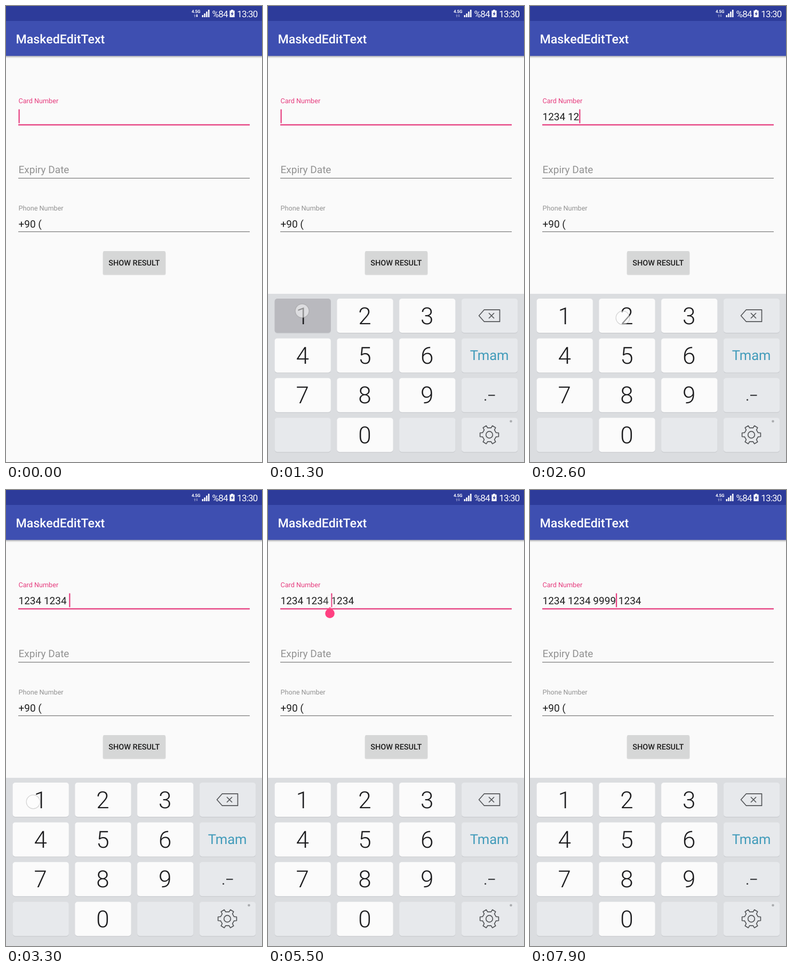
An HTML page that plays this animation: 480x854 px, repeating every 8000 ms.

```html
<!DOCTYPE html>
<html lang="en">
<head>
<meta charset="utf-8">
<title>MaskedEditText</title>
<style>
  html, body { margin: 0; width: 100%; height: 100%; overflow: hidden; background: #fafafa; }
  svg { display: block; width: 480px; height: 854px; }
  text { font-family: Roboto, sans-serif; text-rendering: geometricPrecision; white-space: pre; }
  .medium { font-weight: 500; }
  .field { font-size: 19px; fill: #1d1d1d; }
  .label { font-size: 12.65px; }
  .hint { fill: #929292; }
  .status { font-size: 17px; letter-spacing: -.8px; fill: #fff; }
  .digit { font-size: 44px; font-weight: 300; text-anchor: middle; fill: #1c1c1e; }
  .icon { fill: none; stroke: #55575a; stroke-width: 1.7; stroke-linejoin: round; }
</style>
</head>
<body>
<svg viewBox="0 0 480 854">
  <defs>
    <linearGradient id="shade" x1="0" y1="0" x2="0" y2="1">
      <stop offset="0" stop-color="#000" stop-opacity=".3"/>
      <stop offset="1" stop-color="#000" stop-opacity="0"/>
    </linearGradient>
  </defs>
  <rect width="480" height="854" fill="#fafafa"/>

  <rect y="93" width="480" height="5" fill="url(#shade)"/>
  <rect y="28" width="480" height="65.5" fill="#3e4fb1"/>
  <rect width="480" height="28" fill="#2d3b9a"/>
  <text class="medium" x="18.5" y="69.7" font-size="23.2" fill="#fff">MaskedEditText</text>

  <text x="348" y="13.4" font-size="8" font-weight="700" fill="#fff" letter-spacing="-.2">4.5G</text>
  <path id="upArrow" d="M354 15.5l2 2.5h-1.2v3h-1.6v-3h-1.2z" fill="#fff"/>
  <path id="downArrow" d="M358 21l2-2.5h-1.2v-3h-1.6v3h-1.2z" fill="#fff"/>
  <path d="M367.5 17h2.6v4h-2.6zM371.3 14h2.6v7h-2.6zM375.1 10.5h2.6v10.5h-2.6zM378.9 7h2.6v14h-2.6z" fill="#fff"/>
  <text class="status" x="386.5" y="20.6">%84</text>
  <path d="M422 7h4v1.6h2.6v12.4h-9.2V8.600h2.600z" fill="#fff"/>
  <path d="M425.300 10l-4 5.200h2.400l-1 4 4.200-5.400h-2.500z" fill="#2d3b9a"/>
  <text class="status" x="433.200" y="20.600">13:30</text>

  <text class="label" x="23.500" y="182" fill="#e63c7e">Card Number</text>
  <text id="card" class="field" x="23.500" y="214"></text>
  <rect x="23" y="221.400" width="434" height="2.300" fill="#e63c7e"/>
  <rect id="caret" y="193.500" width="2.200" height="26" fill="#e63c7e"/>
  <path id="handle" d="M116 219L122.500 225.200A8.800 8.800 0 1 1 109.500 225.200Z" fill="#ff4081"/>

  <text class="field hint" x="23.500" y="313" style="fill:#929292">Expiry Date</text>
  <rect x="23" y="321.900" width="434" height="1.200" fill="#777"/>
  <text class="label hint" x="23.500" y="382.500">Phone Number</text>
  <text class="field" x="23.500" y="414.500">+90 (</text>
  <rect x="23" y="422.100" width="434" height="1.200" fill="#777"/>

  <rect x="181.500" y="460.500" width="118" height="43.500" rx="3" fill="#000" opacity=".12"/>
  <rect x="182" y="459" width="117" height="43.300" rx="2.300" fill="#d6d7d7"/>
  <text class="medium" x="240.200" y="485.700" font-size="14.500" text-anchor="middle" fill="#1d1d1d">SHOW RESULT</text>

  <g id="keyboard">
    <rect y="539" width="480" height="315" fill="#dbdde0"/>
    <g id="keys"></g>
    <path class="icon" d="M395.500 580l10-11.200h29v22.400h-29zM414 575l10 10m0-10l-10 10"/>
    <text x="415.200" y="663" font-size="25.600" text-anchor="middle" fill="#419bba">Tmam</text>
    <text x="404" y="739" font-size="28" fill="#3d3f42">.</text>
    <rect x="413" y="728" width="12.500" height="2.200" fill="#3d3f42"/>
    <path id="gear" class="icon"/>
    <circle class="icon" cx="415" cy="803" r="6.300"/>
    <circle cx="455.500" cy="777.700" r="2.300" fill="#a9abae"/>
  </g>
  <circle id="touch" r="12.800" fill="#fff" fill-opacity=".52" stroke="#777" stroke-opacity=".3" stroke-width="1.300"/>
</svg>
<script>
const LOOP = 8000, STEP = 100;
const $ = id => document.getElementById(id);

function add(parent, tag, attrs, text = '') {
  const el = document.createElementNS('http://www.w3.org/2000/svg', tag);
  for (const k in attrs) el.setAttribute(k, attrs[k]);
  el.textContent = text;
  parent.appendChild(el);
  return el;
}

const keys = {};
['123<', '456T', '789.', ' 0 *'].forEach((row, r) => [...row].forEach((name, c) => {
  const x = 12.5 + c * 116.8, y = 548 + r * 74.4;
  const box = { x, width: 105.3, height: 64, rx: 5 };
  const digit = name >= '0' && name <= '9';
  add($('keys'), 'rect', { ...box, y: y + 1.2, fill: '#c9cbcf' });
  const face = add($('keys'), 'rect', { ...box, y, fill: digit ? '#fbfbfb' : '#e7e9ec' });
  if (digit) {
    keys[name] = face;
    add($('keys'), 'text', { class: 'digit', x: x + 52.2, y: y + 47.5 }, name);
  }
}));

// six-toothed outline: wide valleys, narrower raised teeth
function gearPath(cx, cy, teeth) {
  const corners = [[-.29, 13.2], [-.2, 17.8], [.2, 17.8], [.29, 13.2]];
  const pts = [];
  for (let i = 0; i < teeth; i++)
    for (const [da, r] of corners) {
      const a = (i + .5) * 2 * Math.PI / teeth + da;
      pts.push((cx + r * Math.sin(a)).toFixed(1) + ' ' + (cy - r * Math.cos(a)).toFixed(1));
    }
  return 'M' + pts.join('L') + 'Z';
}
$('gear').setAttribute('d', gearPath(415, 803, 6));

// x, y, down, up, key
const taps = [
  [190, 208, 450, 550, ''],
  [64, 571, 1250, 1400, '1'], [176, 583, 1520, 1600, '2'],
  [292, 583, 1720, 1800, '3'], [56, 654, 1910, 2000, '4'],
  [56, 582, 2250, 2350, '1'], [174, 584, 2500, 2600, '2'],
  [290, 584, 2700, 2800, '3'], [54, 658, 2930, 3030, '4'],
  [51, 584, 3350, 3430, '1'], [172, 586, 3560, 3650, '2'],
  [288, 586, 3800, 3900, '3'], [50, 667, 4050, 4180, '4'],
  [117, 210, 5250, 5350, 'place'],
  [307, 743, 6300, 6400, '9'], [306, 742, 6800, 6900, '9'],
  [306, 742, 7150, 7250, '9'], [307, 743, 7500, 7600, '9']
];
const FONT = 19, DIGIT = .5615 * FONT, SPACE = .2475 * FONT;

function group(digits) {
  const s = digits.replace(/(.{4})/g, '$1 ');
  return digits.length >= 16 ? s.trim() : s;
}

function entry(t) {
  let digits = '', at = 0, atEnd = true, reset = t >= 900 ? 900 : -100;
  for (const [, , , up, key] of taps) {
    if (t < up) break;
    reset = Math.max(reset, up);
    if (key === 'place') {
      // the remaining four digits follow the ones typed at the caret
      at = 8;
      atEnd = false;
    } else if (key) {
      digits = digits.slice(0, at) + key + digits.slice(at);
      at++;
    }
  }
  const spaces = atEnd ? Math.floor(at / 4) : Math.ceil(at / 4) - (at === 8 ? 0 : 1);
  return { text: group(digits), x: 23.5 + at * DIGIT + spaces * SPACE, on: (t - reset) % 1000 < 500 };
}

const clamp = v => Math.min(1, Math.max(0, v));
const show = (el, on) => el.setAttribute('opacity', +on);

function draw(t) {
  const { text, x, on } = entry(t);
  $('card').textContent = text;
  $('caret').setAttribute('x', x);
  show($('caret'), on);
  show($('handle'), t >= 5350 && t < 6600);

  const rise = 1 - (1 - clamp((t - 600) / 300)) ** 3;
  $('keyboard').setAttribute('transform', `translate(0 ${315 * (1 - rise)})`);

  for (const k in keys) keys[k].setAttribute('fill', '#fbfbfb');
  let glow = 0;
  for (const [tx, ty, down, up, key] of taps) {
    if (t >= down && t < up && keys[key]) keys[key].setAttribute('fill', '#b9b9be');
    if (t < down - 60 || t >= up + 180) continue;
    glow = t < up ? 1 : 1 - (t - up) / 200;
    $('touch').setAttribute('cx', tx);
    $('touch').setAttribute('cy', ty);
  }
  show($('touch'), 0);
  $('touch').setAttribute('opacity', glow);

  const both = t >= 3900 && t < 5000;
  $('upArrow').setAttribute('opacity', both ? 1 : .4);
  $('downArrow').setAttribute('opacity', both || t < 500 ? 1 : .4);
}

const start = performance.now();
function tick() {
  const t = (performance.now() - start) % LOOP;
  draw(Math.floor(t / STEP) * STEP);
  requestAnimationFrame(tick);
}
tick();
</script>
</body>
</html>
```
